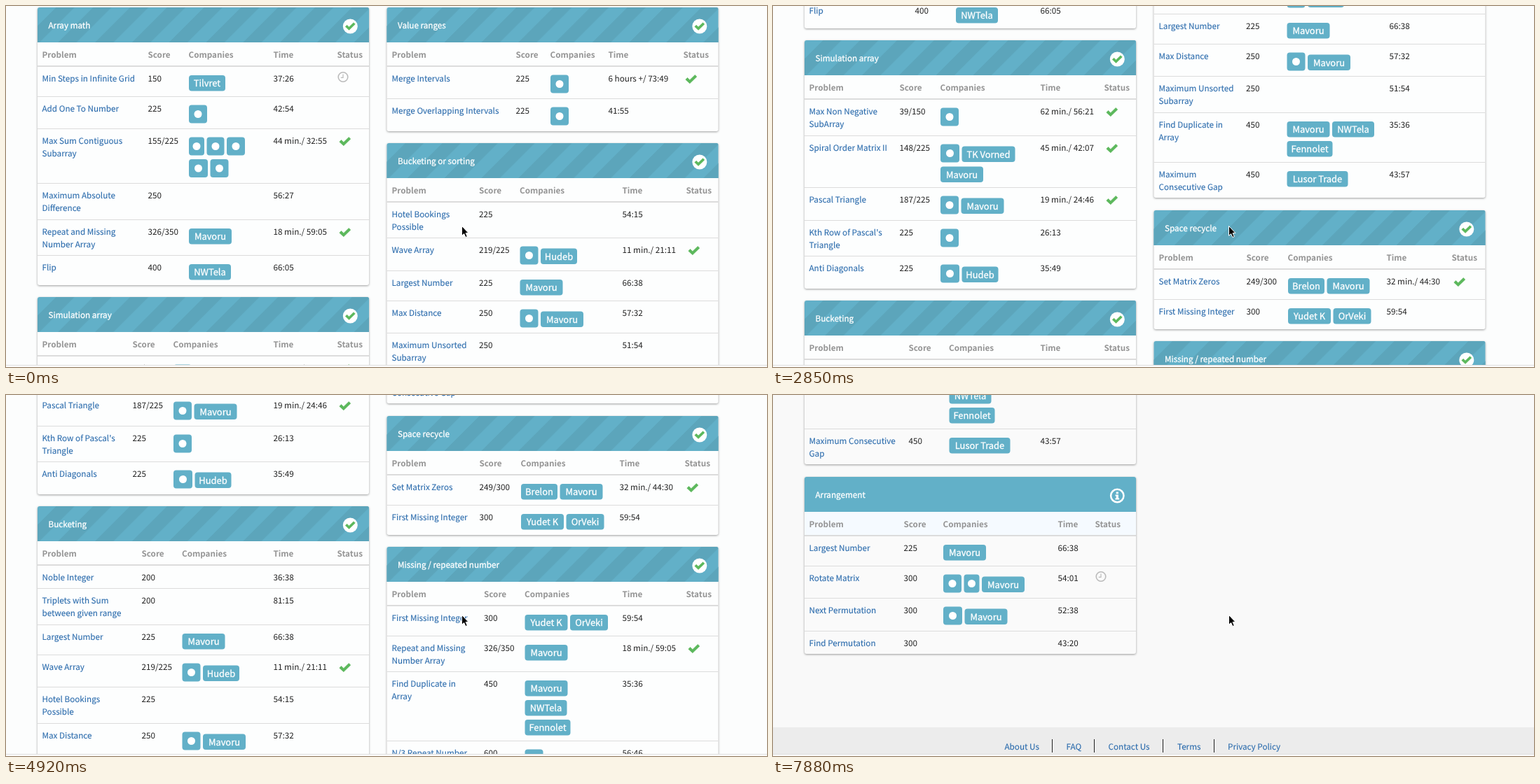
Animation, 1086 px wide and 516 px high, one loop 8000 ms. Source, as an HTML page:

```html
<!DOCTYPE html>
<html lang="en">
<head>
<meta charset="utf-8">
<style>
  html, body { margin: 0; width: 100%; height: 100%; overflow: hidden; }
  svg { display: block; background: #fcfdfd; }
  svg.late { background: #f9f9f9; }
  text { font: 11.7px "Noto Sans CJK SC", "Noto Sans CJK JP", "Noto Sans CJK", "Open Sans", sans-serif;
         text-rendering: geometricPrecision; fill: #222; }
  .title, .badge { fill: #fff; stroke: #fff; stroke-width: .3; }
  .badge { font-size: 12.9px; text-anchor: middle; }
  .col { fill: #959595; font-weight: bold; }
  .link { fill: #2c6cad; stroke: #2c6cad; stroke-width: .12; }
  .card { fill: #fdfefe; filter: drop-shadow(0 1px 1.5px rgba(0, 0, 0, .38)); }
  .late .card { fill: #fafafa; }
  .head { fill: none; }
  .late .head { fill: #f5faff; }
</style>
</head>
<body>
<svg id="stage" width="1086" height="516" viewBox="0 0 1086 516">
  <defs>
    <pattern id="stripes" width="52.8" height="60" patternUnits="userSpaceOnUse"
             patternTransform="translate(26.4) skewX(-45)">
      <rect width="26.4" height="60" fill="#5ca5bb"/>
    </pattern>
    <path id="check" d="M-8 .7L-5.4-2L-2 1.2L5.4-6L8-3.4L-2 6.2Z" fill="#5cb85c"
          stroke="#5cb85c" stroke-width=".6" stroke-linejoin="round"/>
    <g id="done"><circle r="10.5" fill="#fff"/><use href="#check" transform="scale(.88)"/></g>
    <g id="info" fill="#fff">
      <circle r="9.2" fill="none" stroke="#fff" stroke-width="2.5"/>
      <path d="M-1.6-5.6h3.2v2.8h-3.2zM-2.8-1.6h4.4v5h1.3v2h-5.8v-2h1.3v-3h-1.2z"/>
    </g>
    <g id="clock" fill="none" stroke="#bbb" stroke-width="1.6">
      <circle r="6.8"/><path d="M0-4V.8H-3.2" stroke-width="1.2"/>
    </g>
  </defs>
  <g id="page"></g>
  <rect y="513" width="1086" height="3" fill="#fdfdfd"/>
  <rect y="513" width="1086" height="1" fill="#dedede"/>
  <path d="M650.5 314.5V328.3L653.6 325.5L655.9 330.6L658.3 329.5L656 324.6H660Z" fill="#000" stroke="#fff"/>
</svg>
<script>
const BLUE = '#62b0c8', LINE = '#dcdcdc';
const badgeWidth = {
  Mavoru: 61, NWTela: 60, Hudeb: 52, 'TK Vorned': 76, Fennolet: 65,
  'Lusor Trade': 87, Brelon: 52, 'Yudet K': 61, OrVeki: 54, Tilvret: 52
};

// Row: problem, score, badges, time, status. "|" breaks lines; a numeric badge is an icon of that width.
const row = {
  largest: ['Largest Number', '225', 'Mavoru', '66:38'],
  wave: ['Wave Array', '219/225', '26,Hudeb', '11 min./ 21:11', 'check'],
  hotel: ['Hotel Bookings|Possible', '225', '', '54:15'],
  distance: ['Max Distance', '250', '26,Mavoru', '57:32'],
  unsorted: ['Maximum Unsorted|Subarray', '250', '', '51:54'],
  repeat: ['Repeat and Missing|Number Array', '326/350', 'Mavoru', '18 min./ 59:05', 'check'],
  missing: ['First Missing Integer', '300', 'Yudet K,OrVeki', '59:54']
};
const duplicate = (name, badges) => [name, '450', badges, '35:36'];
const gap = name => [name, '450', 'Lusor Trade', '43:57'];

// Card: title, column positions, rows, icon.
const left = [
  ['Array math', [52, 203, 261, 382, 473], [
    ['Min Steps in Infinite Grid', '150', 'Tilvret', '37:26', 'clock'],
    ['Add One To Number', '225', '26', '42:54'],
    ['Max Sum Contiguous|Subarray', '155/225', '22,25,26|27,26', '44 min./ 32:55', 'check'],
    ['Maximum Absolute|Difference', '250', '', '56:27'],
    row.repeat,
    ['Flip', '400', 'NWTela', '66:05']]],
  ['Simulation array', [52, 181, 239, 382, 473], [
    ['Max Non Negative|SubArray', '39/150', '26', '62 min./ 56:21', 'check'],
    ['Spiral Order Matrix II', '148/225', '27,TK Vorned|Mavoru', '45 min./ 42:07', 'check'],
    ['Pascal Triangle', '187/225', '26,Mavoru', '19 min./ 24:46', 'check'],
    ["Kth Row of Pascal's|Triangle", '225', '26', '26:13'],
    ['Anti Diagonals', '225', '27,Hudeb', '35:49']]],
  ['Bucketing', [52, 194, 251.5, 382, 473], [
    ['Noble Integer', '200', '', '36:38'],
    ['Triplets with Sum|between given range', '200', '', '81:15'],
    row.largest, row.wave, row.hotel, row.distance, row.unsorted,
    duplicate('Find Duplicate in Array', 'Mavoru|NWTela|Fennolet'),
    gap('Maximum Consecutive|Gap')]],
  ['Arrangement', [52, 187, 243, 407, 460], [
    row.largest,
    ['Rotate Matrix', '300', '26,22,Mavoru', '54:01', 'clock'],
    ['Next Permutation', '300', '27,Mavoru', '52:38'],
    ['Find Permutation', '300', '', '43:20']], 'info']
];
const right = [
  ['Value ranges', [551, 728, 777, 860, 967], [
    ['Merge Intervals', '225', '26', '6 hours +/ 73:49', 'check'],
    ['Merge Overlapping Intervals', '225', '26', '41:55']]],
  ['Bucketing or sorting', [551, 675.5, 733.5, 880, 971], [
    row.hotel, row.wave, row.largest, row.distance, row.unsorted,
    duplicate('Find Duplicate in|Array', 'Mavoru,NWTela|Fennolet'),
    gap('Maximum|Consecutive Gap')]],
  ['Space recycle', [551, 676, 735, 876, 969], [
    ['Set Matrix Zeros', '249/300', 'Brelon,Mavoru', '32 min./ 44:30', 'check'],
    row.missing]],
  ['Missing / repeated number', [551, 682.5, 740.5, 880, 971], [
    row.missing, row.repeat,
    duplicate('Find Duplicate in|Array', 'Mavoru|NWTela|Fennolet'),
    ['N/3 Repeat Number', '600', '26', '56:46']]]
];

const text = (x, y, s, cls = '') => `<text x="${x - .5}" y="${y}" class="${cls}">${s}</text>`;
const rect = (x, y, w, h, fill, r = 0) =>
  `<rect x="${x}" y="${y}" width="${w}" height="${h}" rx="${r}" fill="${fill}"/>`;
const use = (id, x, y) => `<use href="#${id}" x="${x}" y="${y}"/>`;

function drawBadges(spec, x0, top) {
  let svg = '', used = 0;
  if (spec) for (const line of spec.split('|')) {
    const items = line.split(','), hasIcon = items.some(Number);
    let x = x0;
    for (const item of items) {
      const w = +item || badgeWidth[item], y = top + used;
      if (+item) {
        svg += rect(x, y + 12.5, w, 26, BLUE, 4) +
          `<circle cx="${x + w / 2}" cy="${y + 25.5}" r="5.5" fill="#fff"/>`;
      } else {
        const by = y + (hasIcon ? 15.5 : 13);
        svg += rect(x, by, w, 22.5, BLUE, 4) + text(x + w / 2 + .5, by + 16, item, 'badge');
      }
      x += w + 3.5;
    }
    used += hasIcon ? 31.5 : 28;
  }
  return [svg, used];
}

function drawColumn(cards, x) {
  let y = 1.75, svg = '';
  for (const [title, cols, rows, icon = 'done'] of cards) {
    const top = Math.round(y);
    let body = '';
    y += 84;
    rows.forEach(([name, score, badges, time, status], i) => {
      const ry = Math.round(y), lines = name.split('|');
      const [badgeSvg, used] = drawBadges(badges, cols[2], ry);
      body += rect(x, i ? ry : ry - 1, 473, i ? 1 : 2, LINE) + badgeSvg +
        lines.map((s, k) => text(cols[0], ry + 21.5 + k * 18.2, s, 'link')).join('') +
        text(cols[1], ry + 21.5, score) + text(cols[3], ry + 21.5, time);
      if (status == 'check') body += use('check', cols[4] + 10.8, ry + 18.5);
      if (status == 'clock') body += use('clock', cols[4] + 8, ry + 15.5);
      y += Math.max(lines.length * 18.2 + 15.1, used + 15);
    });
    const shape = 'M0 50V3Q0 0 3 0H470Q473 0 473 3V50Z';
    svg += `<rect class="card" x="${x}" y="${top}" width="473" height="${Math.round(y) - top}" rx="3"/>
      <g transform="translate(${x} ${top})"><path d="${shape}" fill="${BLUE}"/>
      ${icon == 'done' ? `<path d="${shape}" fill="url(#stripes)"/>` : ''}
      <rect class="head" y="50" width="473" height="34"/>
      ${text(16, 29.5, title, 'title')}${use(icon, 446.3, 27)}</g>` +
      ['Problem', 'Score', 'Companies', 'Time', 'Status']
        .map((s, i) => text(cols[i], top + 71.5, s, 'col')).join('') + body;
    y += 17.2;
  }
  return svg;
}

const footer = rect(0, 1722, 1086, 60, '#ececec') +
  [['About Us', 331], ['FAQ', 419], ['Contact Us', 479], ['Terms', 577.5], ['Privacy Policy', 649.5]]
    .map(([s, x]) => text(x, 1753.5, s, 'link')).join('') +
  [398, 458, 556, 629].map(x => rect(x, 1739, 1, 19, '#222')).join('');

const stage = document.getElementById('stage'), page = document.getElementById('page');
page.innerHTML = drawColumn(left, 45) + drawColumn(right, 543.5) + footer;

// Scroll bursts: first step, last step, number of steps, final offset.
const bursts = [
  [300, 780, 4, 104], [1380, 2110, 6, 258], [2560, 3140, 5, 440], [3590, 4180, 5, 554],
  [4480, 5520, 8, 755], [5660, 6540, 7, 966], [6840, 7290, 4, 1190], [7730, 7880, 2, 1247]
];

function scrollAt(t) {
  let pos = 0;
  for (const [start, end, steps, target] of bursts) {
    if (t < start) break;
    const taken = Math.min(steps, 1 + Math.floor((t - start) / (end - start) * (steps - 1) + 1e-6));
    pos += (target - pos) * taken / steps;
  }
  return Math.round(pos);
}

function frame() {
  const t = performance.now() % 8000;
  page.setAttribute('transform', `translate(0 ${-scrollAt(t)})`);
  stage.classList.toggle('late', t >= 7730);
  requestAnimationFrame(frame);
}
frame();
</script>
</body>
</html>
```
